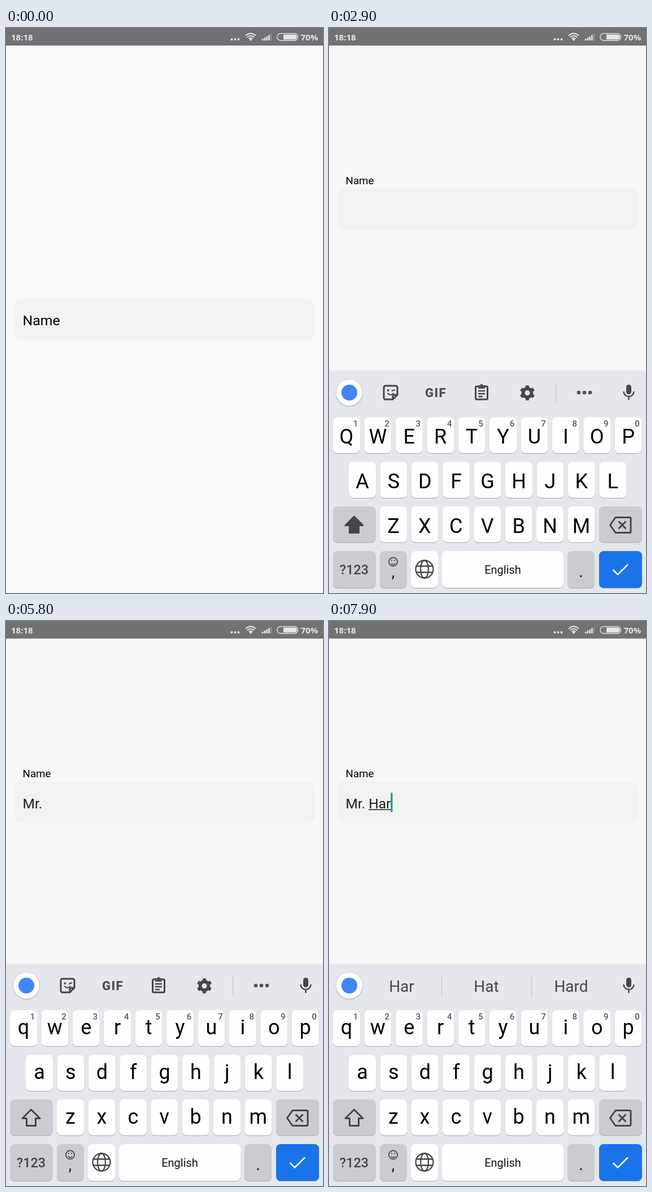
Animation of 561x998 px, one loop 8000 ms. Source, as an HTML page:

```html
<!DOCTYPE html>
<html lang="en">
<head>
<meta charset="utf-8">
<title>Floating label input</title>
<style>
  html, body { margin: 0; width: 100%; height: 100%; overflow: hidden; background: #f7f9f6; }
  svg { display: block; width: 561px; height: 998px; font-family: Roboto, sans-serif; }
  text { white-space: pre; }
  .mid { text-anchor: middle; }
  .line { fill: none; stroke: #444649; stroke-width: 3; stroke-linejoin: round; }
  .dark { fill: #505255; }
  #keys, #popup rect { filter: drop-shadow(0 1.5px .6px rgba(70, 75, 80, .4)); }
  #logo { filter: drop-shadow(0 1px 1.5px rgba(70, 75, 80, .4)); }
</style>
</head>
<body>
<svg viewBox="0 0 561 998">
  <defs>
    <linearGradient id="edge" x2="0" y2="1">
      <stop stop-color="#e4e7eb" stop-opacity="0"/><stop offset="1" stop-color="#dcdfe2"/>
    </linearGradient>
  </defs>
  <rect id="page" width="561" height="998"/>

  <g id="status">
    <rect id="bar" width="561" height="31"/>
    <g fill="#e6e6e6" font-family="Noto Sans, sans-serif" font-size="15" font-weight="600">
      <text x="9" y="21.5">18:18</text>
      <text x="521.5" y="21.5">70%</text>
      <circle cx="399.5" cy="20" r="2"/><circle cx="405.5" cy="20" r="2"/><circle cx="411.5" cy="20" r="2"/>
      <circle cx="433" cy="20.5" r="2"/>
      <path d="M424 13.5q9-8 18 0M426.7 16.5q6.3-5.4 12.6 0M429.5 19q3.5-3 7 0" fill="none" stroke="#e6e6e6" stroke-width="1.8"/>
      <path d="M453 19h2.5v3h-2.5zM456.7 17h2.5v5h-2.5zM460.4 15h2.5v7h-2.5zM464.1 12.5h2.5v9.500h-2.5z"/>
      <path d="M467.800 10h2.200v12h-2.200z" opacity=".3"/>
      <rect x="480" y="9.700" width="36.500" height="12.300" rx="6" fill="none" stroke="#e6e6e6" stroke-width="1.300"/>
      <path d="M491 11.500h19.500a4.300 4.300 0 0 1 0 8.700h-19.500z"/>
    </g>
  </g>

  <g id="field">
    <rect id="box" x="14" width="533" height="74" rx="15"/>
    <text id="label" x="29.500">Name</text>
    <text id="value" x="29.500" y="47" font-size="24.500" fill="#1b1c1b"></text>
    <rect id="underline" y="49" height="1.500" fill="#1b1c1b"/>
    <rect id="cursor" y="20" width="3" height="34" fill="#009688"/>
  </g>

  <g id="keyboard">
    <rect y="603" width="561" height="6" fill="url(#edge)"/>
    <rect y="608" width="561" height="390" fill="#e4e7eb"/>
    <g id="logo">
      <circle cx="36" cy="644" r="23" fill="#fff"/>
    </g>
    <circle cx="36" cy="644" r="14" fill="#4285f4"/>

    <g id="tools">
      <path class="line" d="M100 632h18a3 3 0 0 1 3 3v13l-8 8h-13a3 3 0 0 1-3-3v-18a3 3 0 0 1 3-3zM121 648h-5a3 3 0 0 0-3 3v5"/>
      <circle class="dark" cx="104.500" cy="640" r="2"/>
      <path class="line" style="stroke-width:2" d="M111 641l6-2M103.500 645q5.500 6 11 0"/>
      <text class="mid dark" x="189" y="651.500" font-size="22" font-weight="900" letter-spacing="1.500">GIF</text>
      <rect class="line" x="259.500" y="633" width="21" height="23" rx="2"/>
      <path class="dark" d="M264 631h3a3.200 3.200 0 0 1 6 0h3v6h-12z"/>
      <path class="line" style="stroke-width:2.300" d="M264 641h12M264 646h12M264 651h8"/>
      <circle class="line" cx="351" cy="644.500" r="7.500" stroke-width="6" style="stroke-width:6"/>
      <circle class="line" cx="351" cy="644.500" r="11" pathLength="12" stroke-dasharray="1 1" transform="rotate(15 351 644.500)" style="stroke-width:4.500"/>
      <path d="M401.500 627v34" stroke="#c6c9cd" stroke-width="1.500"/>
      <g class="dark"><circle cx="442" cy="644" r="3.300"/><circle cx="452" cy="644" r="3.300"/><circle cx="462" cy="644" r="3.300"/></g>
    </g>

    <g id="suggestions" class="mid" font-size="28" fill="#45484b">
      <text x="128.500" y="655"></text><text x="278.500" y="655"></text><text x="428.500" y="655"></text>
      <path d="M199.500 626v37M358.500 626v37" stroke="#c6c9cd" stroke-width="1.500"/>
    </g>

    <rect x="526" y="630" width="9" height="17" rx="4.500" fill="#444649"/>
    <path class="line" style="stroke-width:2.400" d="M521.500 642a9 9 0 0 0 18 0M530.500 651v6"/>

    <g id="keys"></g>
    <g id="letters" class="mid" font-size="36"></g>
    <g id="digits" class="mid" font-size="15" font-weight="500" fill="#55585b"></g>

    <path id="shift" class="line" d="M44.500 863l15.500 15.500h-7.500v13h-16v-13h-7.500z"/>
    <path class="line" d="M507 864.500h25q2 0 2 2v23q0 2-2 2h-25l-9.500-13.500zM512.500 871.500l13 13M525.500 871.500l-13 13"/>
    <text class="mid" x="44.500" y="965" font-size="23.400" font-weight="500" fill="#444649">?123</text>
    <g class="line" style="stroke-width:1.700">
      <circle cx="113.500" cy="943" r="7.600"/><path d="M109.500 945.500q4 4 8 0"/>
      <path d="M110 940.500h2M115 940.500h2" stroke-width="2.200"/>
    </g>
    <text class="mid" x="113.500" y="970" font-size="25" font-weight="500" fill="#222">,</text>
    <g class="line" style="stroke-width:2.300">
      <circle cx="169" cy="956" r="15.500"/><ellipse cx="169" cy="956" rx="7" ry="15.500"/>
      <path d="M154.500 950.500h29M154.500 961.500h29"/>
    </g>
    <text class="mid" x="307.500" y="964" font-size="20" fill="#111">English</text>
    <text class="mid" x="446" y="970" font-size="25" font-weight="500" fill="#222">.</text>
    <path d="M502.500 957l8.500 8.500 18-18" fill="none" stroke="#fff" stroke-width="2.600"/>

    <g id="popup">
      <rect x="-28" y="-83" width="56" height="72" rx="8" fill="#fff"/>
      <text class="mid" y="-34" font-size="40"></text>
    </g>
  </g>
</svg>

<script>
const $ = id => document.getElementById(id);
const LOOP = 8000, STEP = 100, BLINK = 500;
const FOCUS = 1280, SHIFTED = 1500, PITCH = 55.4;
const WHITE = '#fdfefd', GREY = '#c9ccd0', PRESSED = '#b4b7bb';

// When the text changes: finished part, part being composed, suggestions
const edits = [
  [1400, '', ''],
  [3400, '', ''],
  [3500, '', 'M', 'M Mr My'],
  [3750, '', 'Mr', 'Mr Me Mrs'],
  [5300, 'Mr.', ''],
  [5950, 'Mr. ', ''],
  [7000, 'Mr. ', 'H', 'H He Hi'],
  [7400, 'Mr. ', 'Ha', 'Ha Has Had'],
  [7600, 'Mr. ', 'Har', 'Har Hat Hard']
];
const presses = [
  [3400, 3500, 'm'], [3600, 3750, 'r'], [5200, 5300, '.'], [5900, 5950, ' '],
  [6900, 7000, 'h'], [7300, 7400, 'a'], [7500, 7600, 'r']
];

function add(parent, tag, attrs, content = '') {
  const node = document.createElementNS('http://www.w3.org/2000/svg', tag);
  for (const name in attrs) node.setAttribute(name, attrs[name]);
  node.textContent = content;
  return parent.appendChild(node);
}

const keys = {}, letters = [];

function addKey(name, x, y, width, fill = WHITE, height = 63.5) {
  const rect = add($('keys'), 'rect', { x, y, width, height, rx: 8, fill });
  keys[name] = { rect, fill, x: x + width / 2, y };
}

function addRow(chars, left, y) {
  [...chars].forEach((char, i) => {
    const x = left + i * PITCH;
    addKey(char, x, y, 48);
    letters.push({ char, y, node: add($('letters'), 'text', { x: x + 24 }) });
    if (y < 700) add($('digits'), 'text', { x: x + 40, y: 704 }, (i + 1) % 10);
  });
}

addRow('qwertyuiop', 7, 687.5);
addRow('asdfghjkl', 35, 766.5);
addRow('zxcvbnm', 90, 845);
addKey('shift', 7, 845, 75.5, GREY);
addKey('delete', 478, 845, 76, GREY);
addKey('symbols', 7, 924, 75.5, GREY, 65);
addKey(',', 90, 924, 47.5, GREY, 65);
addKey('globe', 145, 924, 48, WHITE, 65);
addKey(' ', 200, 924, 215, WHITE, 65);
addKey('.', 422, 924, 48, GREY, 65);
addKey('enter', 478, 924, 76, '#1a73e8', 65);

const show = (node, visible) => node.setAttribute('visibility', visible ? 'visible' : 'hidden');
const move = (node, x, y) => node.setAttribute('transform', `translate(${x} ${y})`);

function drawField(t, edit) {
  const shifted = t >= SHIFTED;
  $('page').setAttribute('fill', shifted ? '#f7f9f6' : '#f9f8fb');
  $('bar').setAttribute('fill', shifted ? '#727371' : '#737175');
  $('box').setAttribute('fill', shifted ? '#f1f3f0' : '#f3f2f4');
  move($('field'), 0, shifted ? 283.5 : 478.5);

  // The label floats up on a damped spring
  const s = Math.max(0, t - FOCUS) / 1000;
  const lift = 1 - Math.exp(-12 * s) * Math.cos(9.6 * s);
  $('label').setAttribute('y', 46 - 54 * lift);
  $('label').setAttribute('font-size', 24.8 - 6 * Math.min(1, lift));

  const [since, done, composing] = edit || [0, '', ''];
  const value = $('value');
  value.textContent = done;
  const start = done ? value.getComputedTextLength() : 0;
  value.textContent = done + composing;
  const end = value.textContent ? value.getComputedTextLength() : 0;
  $('underline').setAttribute('x', 29.5 + start);
  $('underline').setAttribute('width', end - start);
  $('cursor').setAttribute('x', 29.5 + end);
  show($('cursor'), edit && Math.floor((t - since) / BLINK) % 2 === 0);
}

function drawKeyboard(t, edit) {
  const p = Math.min(1, Math.max(0, (t - 1466) / 220));
  move($('keyboard'), 0, 396 * (p === 0) + 390 * (1 - p) ** 2 * (p > 0));

  const [, done, composing, words] = edit || [0, '', ''];
  show($('tools'), !words);
  show($('suggestions'), words);
  const list = (words || '  ').split(' ');
  $('suggestions').querySelectorAll('text').forEach((node, i) => node.textContent = list[i]);

  const upper = !composing && done !== 'Mr.';
  for (const { char, y, node } of letters) {
    node.textContent = upper ? char.toUpperCase() : char;
    node.setAttribute('y', y + (upper ? 46.5 : 42.5));
  }
  $('shift').style.fill = upper ? '#444649' : 'none';

  const press = presses.find(([from, to]) => t >= from && t < to);
  const name = press && press[2];
  for (const id in keys)
    keys[id].rect.setAttribute('fill', id === name && '. '.includes(id) ? PRESSED : keys[id].fill);
  show($('popup'), name && name !== ' ');
  if (name) {
    move($('popup'), keys[name].x, keys[name].y);
    $('popup').querySelector('text').textContent = upper ? name.toUpperCase() : name;
  }
}

function frame(now) {
  const t = Math.floor(now % LOOP / STEP) * STEP;
  const edit = edits.filter(([time]) => time <= t).pop();
  drawField(t, edit);
  drawKeyboard(t, edit);
  requestAnimationFrame(frame);
}
frame(performance.now());
</script>
</body>
</html>
```
